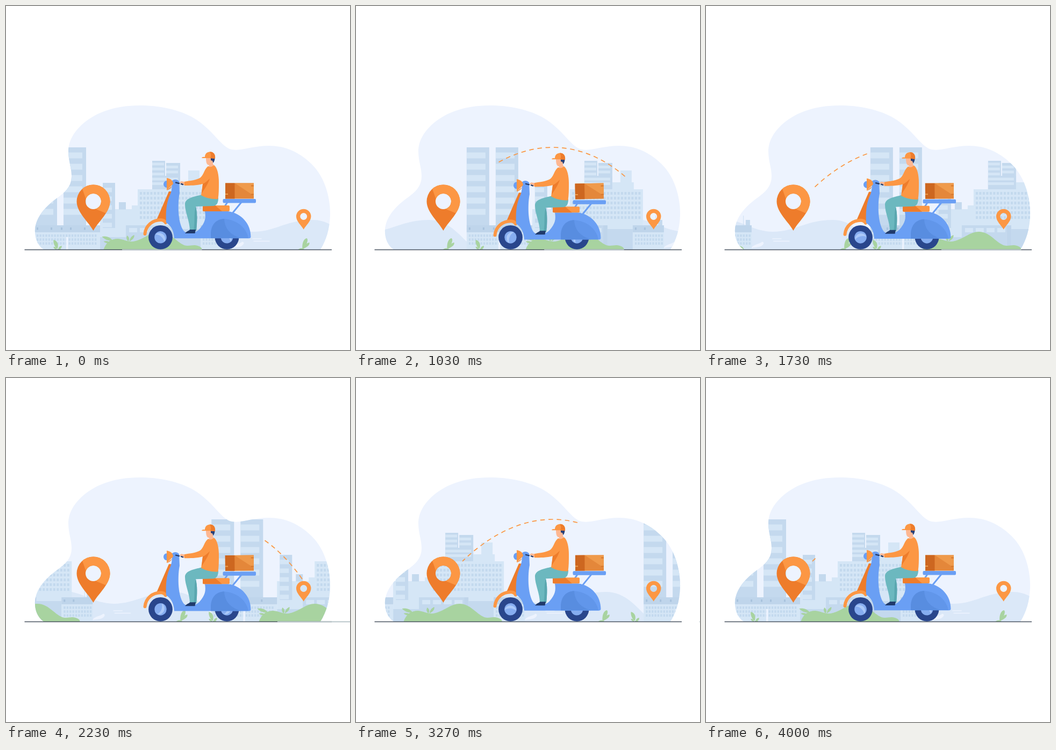
An HTML page for the animation above (4030 ms loop, 640 by 640 pixels).

```html
<!DOCTYPE html>
<html lang="en">
<head>
<meta charset="utf-8">
<title>Scooter delivery</title>
<style>
  html, body { margin: 0; width: 100%; height: 100%; overflow: hidden; background: #fff; }
  svg { display: block; width: 100vw; height: 100vh; }
  .dark { fill: #c4d9ee; }
  .light { fill: #d5e6f6; }
  .strip { fill: #bfd5eb; }
  .win { fill: #c3d9ee; }
  .pale { fill: #edf3fe; }
  .leaf { fill: #a8d3a0; }
  .org { fill: #fc9744; }
  .rust { fill: #ee7c2b; }
  .blue { fill: #6a9ff4; }
  .navy { fill: #29468c; }
  .skin { fill: #fdb792; }
  .route { fill: none; stroke: #fb9641; stroke-width: 1.7; }
</style>
</head>
<body>
<svg viewBox="0 0 640 640">
  <defs>
    <path id="blob" d="M70 453C58 445 53 430 54 415C56 393 72 375 90 361C108 348 122 338 122 316C122 300 116 290 116 268C117 240 143 213 175 199C200 188 225 185 250 185C290 185 330 195 355 212C385 232 398 258 416 266C435 272 455 260 490 260C525 260 555 278 575 301C595 325 604 360 603 390C602 415 596 435 585 453Z"/>
    <clipPath id="inBlob"><use href="#blob"/></clipPath>
    <clipPath id="inLine"><rect x="34.5" y="450" width="571.5" height="6"/></clipPath>

    <g id="hills">
      <path fill="#dbe8f8" d="M-270 453V397C-240 398 -220 419 -182 420C-140 420 -120 398 -70 398C-30 398 -10 432 16 453Z"/>
      <path class="pale" d="M-222 451C-218 443 -206 443 -202 439C-198 438 -197 443 -202 446C-208 450 -215 448 -222 451Z"/>
      <path stroke="#edf3fe" stroke-width="1.6" stroke-linecap="round" d="M-182 433h16M-180 437.5h29"/>
    </g>
    <g id="city"></g>

    <g id="plants">
      <path class="leaf" d="M0 453C5 439 14 433 27 433C40 434 46 441 60 437C78 432 88 420 104 420C124 420 134 438 150 445C160 448 166 443 175 446C181 448 183 450 183 453Z"/>
      <path class="leaf" d="M17 437C9 437 1 434 -3 429C6 427 14 431 17 437ZM14 442C8 442 3 441 0 438C6 436 11 438 14 442Z"/>
      <path class="leaf" d="M46 438C42 434 42 430 44 427C48 430 49 434 46 438ZM48 438C49 432 52 428 57 426C58 431 54 435 48 438Z"/>
      <g transform="translate(-144 0)">
        <path class="leaf" d="M-2 452C-3 442 0 433 6 432C10 434 6 445 -1 452ZM-1 452C1 445 6 441 11 440C12 445 7 448 -1 452ZM-10 453Q-4 448 2 453Z"/>
      </g>
      <g transform="translate(-86 0)">
        <path class="leaf" d="M0 452C-5 448 -8 441 -7 435C1 437 3 445 0 452ZM2 453C2 449 4 447 8 446C9 449 7 452 2 453ZM-1 453C-2 449 -4 448 -7 448C-7 451 -4 453 -1 453ZM0 453Q3 449 7 453Z"/>
      </g>
    </g>

    <g id="wheel">
      <circle class="navy" r="22.4"/>
      <g class="hub">
        <circle fill="#86adf0" r="11.3"/>
        <path fill="#abc9f9" d="M-11.1 2C-4 -3 4 -3 11.1 2A11.3 11.3 0 0 0 -11.1 2Z"/>
      </g>
    </g>
  </defs>

  <use href="#blob" class="pale"/>
  <g clip-path="url(#inBlob)">
    <g id="far"></g>
    <g id="mid"></g>
    <g id="near"></g>
  </g>
  <path stroke="#4a5361" stroke-width="1.7" d="M34.5 453.5H606"/>
  <g id="base" clip-path="url(#inLine)"></g>

  <path class="route" d="M551 374C505 308 440 263 365 263C300 263 240 300 198 341"/>
  <path class="route" d="M551 374C505 308 440 263 365 263C300 263 240 300 198 341"/>

  <clipPath id="inPin"><path id="pin" clip-rule="evenodd" fill-rule="evenodd" d="M162.5 418C154 402 131.500 384 131.500 363.500A31 31 0 0 1 193.500 363.500C193.500 384 171 402 162.500 418ZM162.500 349A14.500 14.500 0 0 0 162.500 378A14.500 14.500 0 0 0 162.500 349Z"/></clipPath>
  <use href="#pin" class="rust"/>
  <path class="org" clip-path="url(#inPin)" d="M141 337L153 372L187 386L200 365V325H141Z"/>
  <use href="#pin" class="org" transform="translate(553.700 391.500) scale(.445) translate(-162.500 -363.500)"/>

  <use href="#wheel" x="411" y="430.300"/>
  <use href="#wheel" x="287.500" y="430.300"/>

  <g id="rider">
    <path class="rust" d="M303 345L280 398Q290 395 298 403L300 368L309 345Z"/>
    <path fill="none" stroke="#fc9744" stroke-width="6" stroke-linecap="round" d="M258.500 424C260 408 273 398 288 398Q294 398 297 403"/>
    <path fill="none" stroke="#6a9ff4" stroke-width="3" d="M412 365L406 374M438 365L420 387"/>
    <path class="blue" d="M309 325Q316 320 322 326L323 348C320 362 318 402 331 419C337 424 352 424 360 415C371 402 372 395 370 382H413C438 385 456 406 455.500 430Q455 432.300 452 432.300H313C312 416 306 408 298 403C297 385 298 368 304 354C308 346 309 340 309 325Z"/>
    <path fill="#6196ea" d="M406 396C430 398 447 412 451 432H381Z"/>
    <path fill="#588de0" d="M381 432V425C381 405 393 396 406 396C407 415 418 426 437 432Z"/>
    <path class="blue" d="M299 325A6 6.500 0 0 0 299 338Z"/>
    <path class="org" d="M299 320C307 321 311 326 311 331L299 343Z"/>
    <path class="rust" d="M299 343L309 335Q306 341 299 343Z"/>
    <rect class="org" x="366" y="371" width="50" height="11" rx="2"/>
    <path class="rust" d="M368 371H389L402 382H368Q366 382 366 380V373Q366 371 368 371Z"/>
    <rect class="blue" x="403.500" y="359" width="61.500" height="7.500" rx="2"/>

    <path fill="#6cb8bf" d="M364 351C350 355 333 357 333 369C333 384 342 400 342 418H354C356 400 356 385 353 373L386 372C393 371 395 365 395 357Z"/>
    <path fill="#5aa7b0" d="M353 373C349 386 352 402 349 418H354C356 400 356 385 353 373Z"/>
    <path fill="#203a6b" d="M333 423C336 419 341 418 342 416H353L351.500 423Z"/>
    <path class="skin" d="M372 282H384L385 293L387 298L377 301L378 296C373 296 372 290 372 282Z"/>
    <path class="org" d="M376 298C381 301 384 298 387 296C393 300 396 314 396 328C396 340 396 350 394.500 359C384 360 371 357 363 352L366 331C355 334 342 334 332 334L331 327C342 325 355 324 362 319C368 314 369 303 376 298Z"/>
    <path class="rust" d="M366 331C371 329 375 325 379 321C376 332 368 342 364 349Z"/>
    <path class="skin" d="M332 327L326 326L322 329L328 330L329 333H332Z"/>
    <path stroke="#29406f" stroke-width="2.400" stroke-linecap="round" d="M316 328.500L322 330M326 331L329 332"/>
    <path fill="#263f78" d="M381 283H388.500C388.500 287 387 290 385.500 292L384 288L381 287Z"/>
    <path class="org" d="M364 282Q367 280 370 281C370 275 374 271.300 380 271.300C386 271.300 390 276 389 284L380 283H365Z"/>
    <path class="rust" d="M379 271.300C386 271.300 390 276 389 284L380 283Q383 277 379 271.300Z"/>
  </g>

  <g id="parcel">
    <rect fill="#e4873a" x="408" y="329.500" width="53" height="29"/>
    <path fill="#ef9a4b" d="M425.500 329.500H461V353Z"/>
    <rect fill="#cd6720" x="408" y="329.500" width="17.500" height="29"/>
    <path stroke="#f0a050" stroke-width="2" d="M408 350h5"/>
    <path stroke="#d5772c" stroke-width="2" d="M456 334.500h5M456 350.500h5"/>
  </g>
</svg>

<script>
const NS = 'http://www.w3.org/2000/svg';
const $ = id => document.getElementById(id);
const LOOP = 4030, CITY = 588, GROUND = 516, BOB = 20;

function add(parent, tag, attrs) {
  const el = document.createElementNS(NS, tag);
  for (const name in attrs) el.setAttribute(name, attrs[name]);
  return parent.appendChild(el);
}

const city = $('city');
const box = (kind, x, y, right, bottom) =>
  add(city, 'rect', { class: kind, x, y, width: right - x, height: bottom - y });

function bars(x, right, y, step, height, count) {
  for (let i = 0; i < count; i++) box('light', x, y + i * step, right, y + i * step + height);
}

function windows(x, y, cols, rows, dx, dy, w, h) {
  let d = '';
  for (let r = 0; r < rows; r++)
    for (let c = 0; c < cols; c++) d += `M${x + c * dx} ${y + r * dy}h${w}v${h}h${-w}z`;
  add(city, 'path', { class: 'win', d });
}

// Striped block beside the offices
box('dark', 219, 288, 243, 341);
box('dark', 245, 292, 271, 341);
box('dark', 219, 316, 271, 341);
bars(219, 241, 291.5, 9.3, 5, 3);
bars(245, 267, 297, 9.3, 5, 2);
bars(219, 267, 319.5, 8.5, 5, 2);
// Offices
box('light', 192, 341, 328, 453);
box('light', 271, 328, 311, 342);
box('light', 286, 306, 307, 329);
windows(196, 346, 20, 6, 6.5, 9, 4, 5);
// Low blocks
box('light', 122, 378, 193, 453);
box('light', 181, 371, 193, 380);
box('dark', 157, 365, 170, 378.5);
box('dark', 127, 329, 150, 413);
bars(127, 144, 338, 16.3, 8.5, 5);
box('dark', 122, 430, 254, 453);
box('dark', 170, 408, 254, 430);
for (let i = 0; i < 4; i++) box('light', 176 + i * 20, 413, 191 + i * 20, 421);
box('strip', 254, 408, 262, 453);
box('dark', 262, 415, 309, 453);
// Twin towers
for (const x of [0, 54]) {
  box('dark', x, 263, x + 42, 409);
  bars(x, x + 35, 272.5, 21, 11, 6);
}
// Arcades
function arcade(x, right, cols) {
  box('light', x, 408, right, 453);
  box('strip', x, 408, right, 421);
  windows(x + 4, 425, cols, 3, 5.4, 7.3, 3.4, 4.5);
}
arcade(0, 122, 21);
box('pale', 59, 430, 62.5, 453);
box('dark', 356, 398, 364, 408);
box('dark', 351.5, 390, 352.3, 408);
arcade(309, 367, 10);
for (const x of [4, 30, 49, 66, 92, 313, 330])
  add(city, 'rect', { x, y: 412, width: 3, height: 4.5, fill: '#a9c3de' });

// Repeat each layer so that it covers the stage while it slides
for (const i of [-1, 0, 1]) {
  add($('far'), 'use', { href: '#hills', x: i * CITY });
  add($('mid'), 'use', { href: '#city', x: i * CITY });
  add($('near'), 'use', { href: '#plants', x: i * GROUND });
  add($('base'), 'path', {
    d: `M${i * GROUND} 453.5h183`, stroke: '#b9c6ca', 'stroke-width': 2
  });
}

const routes = [...document.querySelectorAll('.route')];
const length = routes[0].getTotalLength();
const hub = document.querySelector('.hub');
const slide = (id, x) => $(id).setAttribute('transform', `translate(${x} 0)`);

// Dashes between a moving tail and a head 20 steps ahead of it
function drawRoute(path, step) {
  const clamp = d => Math.max(0, Math.min(length, d));
  const head = clamp(step * 12.7), tail = clamp((step - 20) * 12.7);
  const dashes = [0, tail];
  for (let d = tail; d < head; d += 15.3) dashes.push(Math.min(8.5, head - d), 6.8);
  dashes[dashes.length - 1] = 999;
  path.setAttribute('stroke-dasharray', dashes.join(' '));
}

function draw(now) {
  const k = Math.floor((now % LOOP + 10) / 40);
  const cityX = 53 + k * CITY / 100;
  const groundX = 181.5 + (k < 91 ? k : k - 1) * GROUND / 100;
  slide('far', cityX);
  slide('mid', cityX);
  slide('near', groundX);
  slide('base', groundX);

  const lift = (1 - Math.cos(k / BOB * 2 * Math.PI)) / 2;
  $('rider').setAttribute('transform', `translate(0 ${3.5 * lift})`);
  $('parcel').setAttribute('transform', `translate(0 ${1.6 * lift}) rotate(${-1.6 * lift} 408 358.5)`);
  hub.setAttribute('transform', `rotate(${40 - k * 360 / BOB})`);

  drawRoute(routes[0], k);
  drawRoute(routes[1], k - 48);
}

function tick() {
  draw(performance.now());
  requestAnimationFrame(tick);
}
tick();
</script>
</body>
</html>
```
